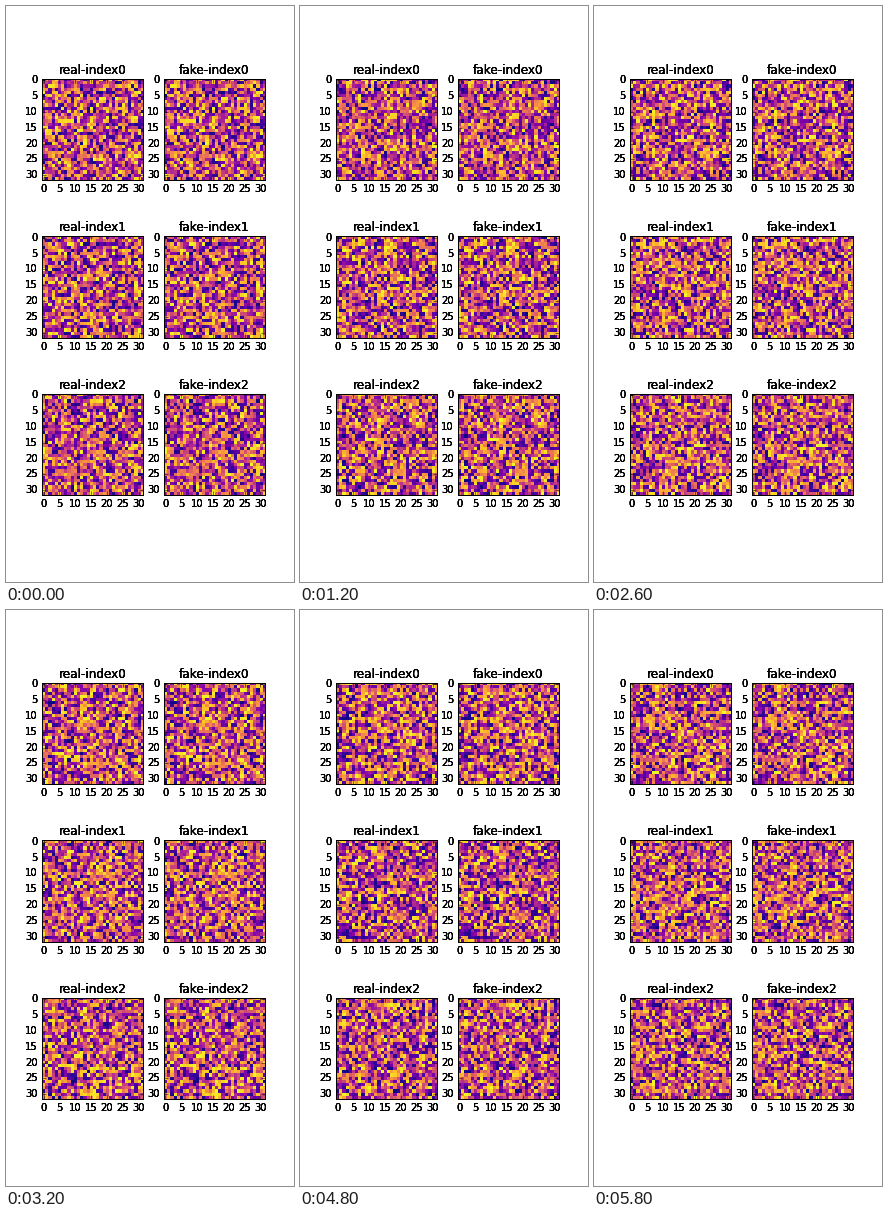
Animation, 288 px wide and 576 px high, one loop 6 s. Source, as a matplotlib script:

```python
import numpy as np
import matplotlib.pyplot as plt
from matplotlib.animation import FuncAnimation

FRAMES, INTERVAL = 30, 200
ROWS, CELLS = 3, 32
TICKS = range(0, CELLS, 5)
LAYERS = 4  # overlaid copies give the labels their heavy edges

plt.rcParams.update({
    "font.family": "DejaVu Sans",
    "font.size": 10,
    "axes.linewidth": 1.0,
})

np.random.seed(7)
noise = np.random.rand(FRAMES, ROWS, CELLS, CELLS)

fig, grid = plt.subplots(ROWS, 2, figsize=(4, 8), dpi=72, facecolor="white")
fig.subplots_adjust(left=0.125, right=0.9, bottom=0.125, top=0.9,
                    wspace=0.2, hspace=0.2)


def label(ax, text, xy, coords, offset, **style):
    for _ in range(LAYERS):
        ax.annotate(text, xy, xycoords=coords, xytext=offset,
                    textcoords="offset points", annotation_clip=False, **style)


def make_panel(ax, title, data):
    image = ax.imshow(data, cmap="plasma", vmin=0, vmax=1,
                      interpolation="nearest")
    ax.set_xticks(TICKS)
    ax.set_yticks(TICKS)
    ax.tick_params(direction="in", length=4, width=0.5, top=True, right=True,
                   labelbottom=False, labelleft=False)
    across, down = ax.get_xaxis_transform(), ax.get_yaxis_transform()
    for t in TICKS:
        label(ax, str(t), (t, 0), across, (0, -4), ha="center", va="top")
        label(ax, str(t), (0, t), down, (-4, 0), ha="right", va="center")
    label(ax, title, (0.5, 1), "axes fraction", (0, 5),
          ha="center", va="baseline", fontsize=12)
    return image


panels = [[make_panel(ax, f"{kind}-index{row}", noise[0, row])
           for ax, kind in zip(axes, ("real", "fake"))]
          for row, axes in enumerate(grid)]


def update(frame):
    for row, pair in enumerate(panels):
        for image in pair:
            image.set_data(noise[frame, row])
    return [image for pair in panels for image in pair]


anim = FuncAnimation(fig, update, frames=FRAMES, interval=INTERVAL,
                     repeat=True, repeat_delay=0, blit=False)
plt.show()
```
